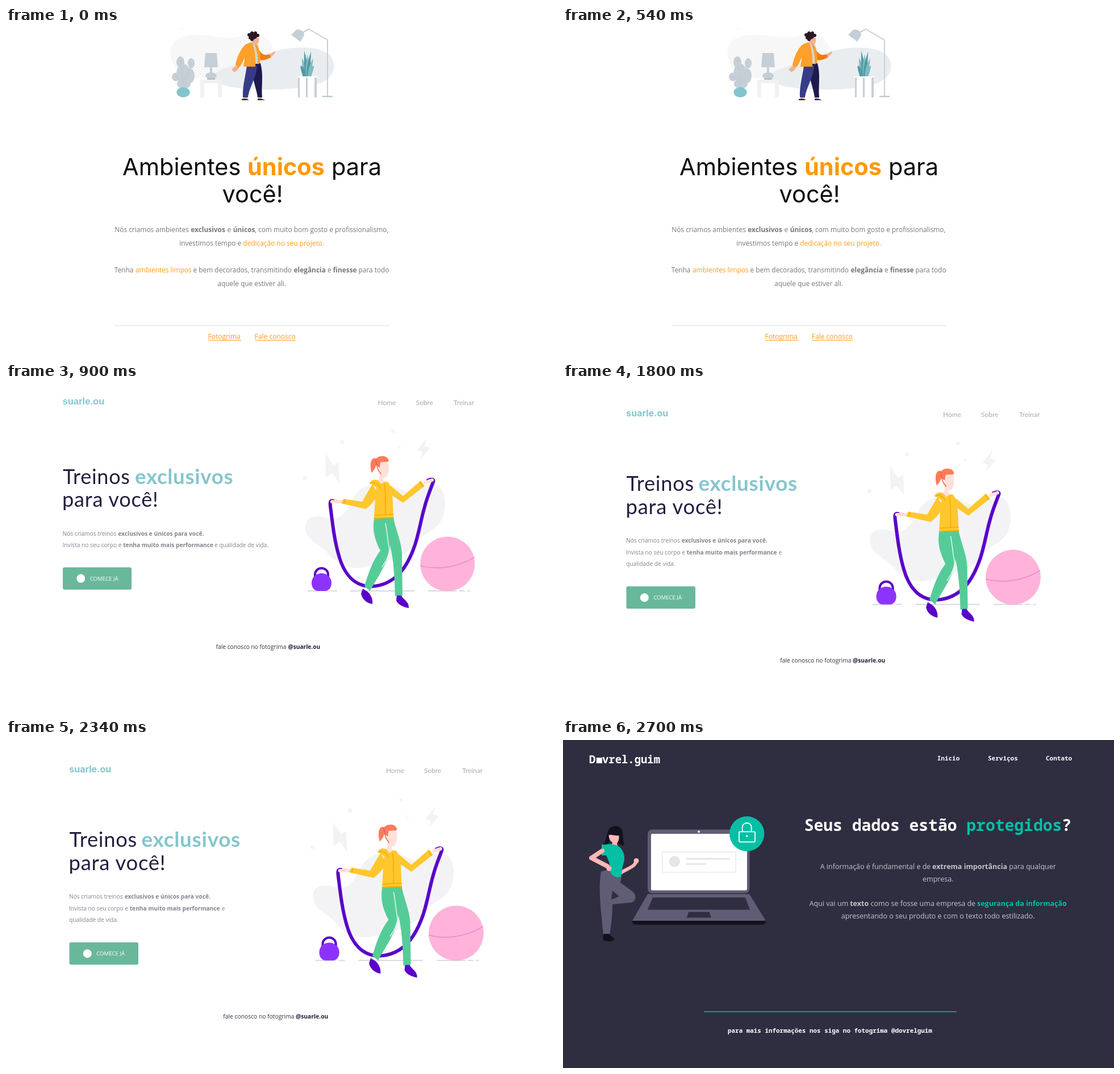
Animation of 970 by 577 pixels, one loop 3.6 s. Source, as an HTML page:

```html
<!DOCTYPE html>
<html lang="pt-BR">
<head>
<meta charset="utf-8">
<title>Páginas</title>
<style>
  html, body { margin: 0; width: 100%; height: 100%; overflow: hidden; background: #fff; }
  svg { display: block; width: 970px; height: 577px; }
  text { white-space: pre; font-optical-sizing: none; }
  .open { font-family: "Open Sans", sans-serif; }
  .inter { font-family: Inter, sans-serif; }
  .lato { font-family: Lato, sans-serif; }
  .arial { font-family: "Liberation Sans", Arial, sans-serif; }
  .mono { font-family: "Noto Sans Mono", monospace; }
</style>
</head>
<body>
<svg id="stage" viewBox="0 0 970 577" xmlns="http://www.w3.org/2000/svg"></svg>
<script>
const SLIDE_MS = 900;

// Markup helpers
const text = (font, size, fill, weight, x, y, str) =>
  `<text class="${font}" font-size="${size}" fill="${fill}" font-weight="${weight}" x="${x}" y="${y}">${str}</text>`;
// runs: [x, text, weight, colour]
const line = (size, fill, y, ...runs) =>
  runs.map(([x, str, weight = 400, col = fill]) => text('open', size, col, weight, x, y, str)).join('');
const path = (d, fill) => `<path d="${d}" fill="${fill}"/>`;
const stroke = (d, col, w, cap = 'round') =>
  `<path d="${d}" fill="none" stroke="${col}" stroke-width="${w}" stroke-linecap="${cap}" stroke-linejoin="round"/>`;
const oval = (x, y, rx, ry, fill) => `<ellipse cx="${x}" cy="${y}" rx="${rx}" ry="${ry}" fill="${fill}"/>`;
const dot = (x, y, r, fill) => oval(x, y, r, r, fill);
const box = (x, y, w, h, fill, r = 0) =>
  `<rect x="${x}" y="${y}" width="${w}" height="${h}" rx="${r}" fill="${fill}"/>`;

function livingRoom() {
  const grey = '#c5cfd7', pale = '#f1f1f1', teal = '#84c4cc';
  const navy = '#1d1a4f', blue = '#373c88', orange = '#ffa02b', skin = '#f0b095';
  const backdrop =
    `<pattern id="specks" width="6" height="5" patternUnits="userSpaceOnUse">
      <circle cx="1.5" cy="1.5" r="1" fill="#efefef"/><circle cx="4.5" cy="4" r="1" fill="#efefef"/></pattern>` +
    oval(309, -2, 8, 3, '#ececec') +
    ['#f9f9f9', 'url(#specks)'].map(fill => path(
      'M290 50C286 25 304 12 338 12C372 12 386 22 414 14C440 8 466 14 468 34C466 58 400 64 372 78C344 96 298 92 290 50Z', fill)).join('') +
    path('M366 84C370 69 412 66 452 48C492 31 552 28 571 49C586 70 575 93 540 101C490 112 404 110 379 99C368 94 363 90 366 84Z', '#eaedf0');
  const plant =
    oval(307, 60, 7, 10, grey) + oval(299, 86, 7, 7.5, grey) + oval(326, 62, 6, 9, grey) +
    oval(312, 80, 12, 17, grey) + oval(324, 84, 8, 13, grey) + oval(313, 98, 12, 9, grey) +
    stroke('M308 56C309 72 312 88 312 103M325 62C324 76 318 86 313 92M299 86L311 96', '#b7c3cc', .7) +
    oval(312, 113, 11.7, 9, teal);
  const table =
    path('M351 44H371L373 69H349Z', grey) + box(359, 69, 4, 10, grey) +
    oval(361, 84, 10, 6, grey) + box(354, 88, 14, 3, '#b4c0c9') +
    box(342, 91, 38, 6, pale) + box(342, 95, 7, 27, pale) + box(373, 95, 7, 27, pale);
  const man =
    path('M437 62H448C454 84 449 103 451 122H443C441 108 436 96 434 82Z', navy) +
    path('M424 66H442C441 88 429 102 426 122H417C416 102 422 84 424 66Z', blue) +
    path('M418 122H425L426 125H417ZM443 122H450L451 125H444Z', skin) +
    path('M415 127V125C419 124 424 124 428 127ZM443 127V125C447 124 452 125 456 127Z', navy) +
    path('M444 36C449 44 453 50 464 46L467 51C457 58 448 58 443 54Z', '#f07c13') +
    path('M464 46C468 45 470 42 473 41L474 43C472 46 470 49 466 51Z', skin) +
    path('M433 26L443 27C447 38 448 52 445 63H436Z', '#d0d6db') +
    path('M407 64L410 70C408 74 404 78 401 77L397 73Z', skin) +
    path('M432 25C437 32 440 48 439 68H418C419 60 420 56 420 52C417 60 414 65 410 70L404 65C407 49 416 30 426 27Z', orange) +
    path('M439 26C446 35 449 44 447 62L443 64C444 48 441 36 436 26Z', orange) +
    path('M433 17H445C446 24 444 29 440 28L439 32L433 27Z', skin) +
    oval(435, 14, 7.5, 6, '#2a1922') +
    [[428, 12], [433, 9], [439, 9], [443, 13], [430, 17], [433, 20]].map(([x, y]) => dot(x, y, 3, '#2a1922')).join('');
  const leaves = [[521, 52, -3], [525, 40, -1], [531, 46, 0], [537, 41, 1], [541, 53, 3], [519, 66, -5], [542, 66, 5]];
  const stand = leaves.map(([x, y, k], i) =>
      path(`M${x} ${y}Q${531 + k * 1.5 + 4} 70 ${532 + k} 86H${528 + k}Q${528 + k * 1.8 - 2} 68 ${x} ${y}Z`,
        i % 2 ? '#5199a2' : '#7bbcc2')).join('') +
    box(513, 85, 35, 4, '#fff') + box(514, 87, 3, 35, grey) + box(528, 87, 3, 35, grey) + box(543, 87, 4, 35, grey) +
    box(517, 87, 11, 35, '#fff') + box(531, 87, 12, 35, '#fff');
  const lamp =
    stroke('M566 120V21L533 2L522 8', grey, 2) + box(557, 119.5, 18, 2, '#b2bec8') +
    path('M502 12L511 3C518 1 525 6 525 13L518 24Z', grey);
  return backdrop + plant + table + man + stand + lamp;
}

function interiors() {
  const orange = '#ff9a1a', grey = '#77777a', under = 'M356 549.3H414.5M438.5 549.3H510';
  const head = (x, y, str, weight = 400, fill = '#0b0b0b') => text('inter', 41.5, fill, weight, x, y, str);
  return livingRoom() +
    head(205, 259, 'Ambientes') + head(425, 259, 'únicos', 700, '#ff9900') + head(573, 259, 'para') +
    head(380.5, 307, 'você!') +
    line(11.9, grey, 359, [191.3, 'Nós criamos ambientes'], [325.3, 'exclusivos', 700], [389.5, 'e'],
      [399.7, 'únicos', 700], [438, ', com muito bom gosto e profissionalismo,']) +
    line(11.9, grey, 383, [305.2, 'investimos tempo e'], [417.3, 'dedicação no seu projeto.', 400, orange]) +
    line(11.9, grey, 430, [190.7, 'Tenha'], [228, 'ambientes limpos', 400, orange],
      [329.5, 'e bem decorados, transmitindo'], [506.5, 'elegância', 700], [566, 'e'],
      [575.7, 'finesse', 700], [620.5, 'para todo']) +
    line(11.9, grey, 454, [372.3, 'aquele que estiver ali.']) +
    box(191, 522, 484, 2.6, '#f1f1f1') +
    line(12, orange, 547, [355.5, 'Fotogrima'], [437.7, 'Fale conosco']) + stroke(under, orange, 1, 'butt');
}

function jumper() {
  const violet = '#5a00c9', yellow = '#ffc72d', amber = '#f7ab00', green = '#55cc98';
  const skin = '#ffe1da', red = '#ff7b5b', mist = '#f3f3f6';
  const scene =
    path('M527 254C525 236 541 228 566 236C604 244 602 200 626 184C650 170 684 178 704 190C724 200 730 174 752 176C774 180 777 212 769 234C760 258 740 258 728 274C706 308 654 318 624 323C588 328 572 302 556 288C542 278 528 270 527 254Z', mist) +
    path('M562 122L576 143L585 138L587 174L574 157L563 164ZM741 95L737 109L747 112L729 133L733 120L724 116Z', mist) +
    dot(592, 102, 3.4, mist) + dot(681, 83, 3, mist) + dot(693, 112, 2, mist) + dot(526, 166, 3.6, mist) +
    stroke('M532 364H566M573 364H582M607 364H718M744 364H793M798 364H807M813 364H816', '#d6d8e3', 2);
  const gear =
    stroke('M544 340V335A11.5 11 0 0 1 567 335V340', violet, 4) +
    path('M538 350C538 339 547 333 555.5 333S573 339 573 350C573 359 567 364 562 364H549C544 364 538 359 538 350Z', '#8d33ff') +
    dot(777.3, 316.5, 48, '#ffb3da') + stroke('M730 320C762 328 796 322 824 305', '#ee8fc8', 1.8);
  const rope = stroke(
    'M576 205.5H573C570 206 570.5 212 571.5 219C575 247 578 275 586 302C595 334 613 356 643 356C688 354 708 318 720 283C728 258 730 240 737 216C742 197 748 184 752.5 171C753 167 748 167 743 169.5', violet, 6);
  const legs =
    path('M648 237L682 234C685 254 696 276 697 298L698 372L685 373C684 338 682 306 676 284C677 308 655 338 641 364L631 356C638 332 646 310 659 293C648 272 645 256 648 237Z', green) +
    stroke('M668 245C671 260 672 276 675 292C674 302 668 313 662 322', '#fff', 1.2) +
    path('M628 360L636 365C643 371 646 379 645 387C636 386 627 379 625 369ZM688 372H696C700 380 710 383 709 394C700 393 690 388 687 381Z', violet);
  const body =
    stroke('M574 207H592M738 173L750 169', skin, 6) +
    stroke('M576 205L582 208M580 203L586 206M745 167L750 171', '#e9b9b1', .8) +
    path('M645 176L627 207L594 202L590 210L633 220C642 214 650 203 656 195ZM676 178L699 197L730 170L737 179L699 209L677 194Z', yellow) +
    path('M640 174C644 167 652 167 658 171L672 172C682 182 681 210 682 236H648C649 216 650 196 652 182Z', yellow) +
    stroke('M666 176C669 194 668 212 668 229M649 231L682 229M648 236.5L682 235M641 175C648 171 656 176 659 183M597 203L595 210M729 173L734 181', amber, 1.6) +
    path('M658 158L664 164L665 173L660 176L656 170Z', skin) +
    path('M658 136C664 131 673 134 674 142C675 154 672 165 665 165C657 164 655 148 658 136Z', skin) +
    path('M650 134C653 125 673 123 674 136C669 138 663 136 659 138L658 147C653 146 650 140 650 134Z', red) +
    path('M651 131C643 128 639 140 644 157C646 152 651 150 652 140Z', red) +
    stroke('M651 133C652 145 655 153 660 158', '#ef5f42', 1.5);
  return scene + gear + rope + legs + body;
}

function button(x, y, w) {
  return box(x, y, w, 39.3, '#69b89c', 3) + dot(x + 31.8, y + 19.7, 7.5, '#fff') +
    text('open', 9.6, '#fff', 400, x + 47.7, y + 23.2, 'COMECE JÁ');
}

function training(wide) {
  const ink = '#231f3f', teal = '#86c5cc', grey = '#85838e', menu = '#a9a7b2';
  const x = wide ? 111.5 : 100, y = wide ? 12.4 : 0, size = wide ? 36.3 : 36;
  const brand = wide
    ? text('inter', 16, teal, 700, 111.3, 57, 'suarle.ou')
    : text('arial', 16.6, teal, 700, 99.5, 35.5, 'suarle.ou');
  const nav = (wide ? [669, 736, 803] : [654.5, 721.5, 788])
    .map((nx, i) => text('lato', 12, menu, 400, nx, wide ? 58 : 36.5, ['Home', 'Sobre', 'Treinar'][i])).join('');
  const title = `<g letter-spacing=".75">` +
    text('lato', size, ink, 400, x, 176 + y, 'Treinos') +
    text('lato', size + .5, teal, 700, x + 127, 176 + y, 'exclusivos') +
    text('lato', size + .2, ink, 400, x - 1, 216.4 + y, 'para você!') + '</g>';
  const copy = line(10.2, grey, 267 + y, [x - .5, 'Nós criamos treinos'], [x + 97.3, 'exclusivos e únicos para você.', 700]) +
    line(10.2, grey, 287.2 + y, [x - .5, 'Invista no seu corpo e'], [x + 106.2, 'tenha muito mais performance', 700],
      [x + (wide ? 268.3 : 267), wide ? 'e' : 'e qualidade de vida.']) +
    (wide ? line(10.2, grey, 320, [x - .5, 'qualidade de vida.']) : '');
  const foot = wide
    ? line(10.3, '#33303f', 490, [382.3, 'fale conosco no fotogrima'], [510, '@suarle.ou', 700, ink])
    : line(10.2, '#33303f', 466, [369.6, 'fale conosco no fotogrima'], [496.5, '@suarle.ou', 700, ink]);
  const art = wide ? 'matrix(1.007 0 0 1.007 9.7 21.2)' : 'translate(0 0)';
  return brand + nav + title + copy + (wide ? button(111.5, 356, 121.5) : button(100, 322.4, 121)) +
    `<g transform="${art}">${jumper()}</g>` + foot;
}

function laptop(bg, teal) {
  const steel = '#605c75', black = '#13121c', pale = '#e6e6e6';
  return box(149, 157.5, 179.5, 112, steel, 8) + box(155, 165, 169, 99.5, '#fff', 2.5) + dot(239, 161.3, 2, '#fff') +
    `<rect x="174.7" y="196.8" width="129.5" height="35.8" rx="1.5" fill="none" stroke="${pale}" stroke-width="1.3"/>` +
    dot(196.2, 213.6, 9.6, pale) + box(216, 207.5, 78.5, 3, pale, 1.5) + box(216, 216.8, 36, 3, pale, 1.5) +
    path('M122 317H357V320Q356 325 350 325H129Q123 325 122 320Z', black) +
    path('M149 271H328L357 318H122Z', steel) +
    path('M158 277H321L329 298.5H149ZM221 302.5H257.5L261 312.5H218Z', bg) +
    dot(323.7, 165, 30.7, teal) +
    `<rect x="310" y="161.3" width="28" height="18" rx="1.2" fill="none" stroke="#fff" stroke-width="1.8"/>` +
    stroke('M315.7 161V153.5A8 7.5 0 0 1 331.7 153.5V161', '#fff', 1.8, 'butt') + dot(323.7, 169, 1.8, '#fff');
}

function analyst(teal) {
  const steel = '#605c75', black = '#13121c', skin = '#ffb8b8';
  return path('M78 164C80 152 91 149 99 153C107 157 105 168 106 176L108 185C102 186 97 182 95 178L82 176C82 182 77 186 71 185C75 178 76 171 78 164Z', black) +
    path('M81 165H98C100 174 97 180 95 181L96 189L85 188L87 180C82 177 80 172 81 165Z', skin) +
    path('M79 167C80 156 98 154 101 168C93 169 86 166 79 167Z', black) +
    path('M67 232C76 226 96 231 103 238C103 244 101 248 101 251L122 266C130 272 129 284 120 286L87 289C87 308 85 326 82 342H71C68 308 61 262 67 232ZM87 265L85 281L99 275Z', steel) +
    path('M72 341H81C83 345 91 347 90 351C88 355 76 355 71 352C70 348 70 345 72 341Z', black) +
    stroke('M101 234C110 228 118 226 125 220L130 213', skin, 6) + dot(129, 212.5, 4.5, skin) +
    path('M68 184C77 184 88 181 98 187C107 194 111 206 106 219C103 228 105 236 101 241C92 243 86 238 83 232C84 220 80 211 76 203L68 203Z', teal) +
    stroke('M69 195L50 207.5L78 222', skin, 8) + dot(81, 226, 4.5, skin);
}

function security() {
  const bg = '#2f2d40', teal = '#05bfa5', body = '#c6c5cb';
  const mono = (size, x, y, str, fill = '#fff', weight = 700) => text('mono', size, fill, weight, x, y, str);
  return box(0, 0, 970, 577, bg) +
    mono(18.9, 46, 40.5, 'D', '#fff', 600) + box(58.8, 31, 10, 10, '#fff') + mono(18.9, 69, 40.5, 'vrel.guim', '#fff', 600) +
    mono(11, 658.7, 36, 'Inicio') + mono(11, 748, 36, 'Serviços') + mono(11, 850, 36, 'Contato') +
    laptop(bg, teal) + analyst(teal) +
    mono(28, 424.7, 160, 'Seus dados estão') + mono(28, 710.3, 160, 'protegidos', teal) + mono(28, 878.3, 160, '?') +
    line(12.5, body, 227, [452.7, 'A informação é fundamental e de'], [650, 'extrema importância', 700], [785.3, 'para qualquer']) +
    line(12.5, body, 248.6, [633, 'empresa.']) +
    line(12.5, body, 292.2, [433.7, 'Aqui vai um'], [505.2, 'texto', 700], [541.5, 'como se fosse uma empresa de'],
      [729, 'segurança da informação', 700, teal]) +
    line(12.5, body, 314, [489.7, 'apresentando o seu produto e com o texto todo estilizado.']) +
    box(248, 477, 444.7, 1.8, '#07a792') +
    mono(10.92, 290, 514.5, 'para mais informações nos siga no fotogrima @dovrelguim');
}

const stage = document.getElementById('stage');
stage.innerHTML = box(0, 0, 970, 577, '#fff') +
  [interiors(), training(false), training(true), security()].map(s => `<g class="slide">${s}</g>`).join('');
const slides = [...stage.querySelectorAll('.slide')];

function draw(ms) {
  const current = Math.floor(ms / SLIDE_MS) % slides.length;
  slides.forEach((s, i) => s.setAttribute('display', i === current ? 'inline' : 'none'));
}

const start = performance.now();
function tick() {
  draw(performance.now() - start);
  requestAnimationFrame(tick);
}
draw(0);
requestAnimationFrame(tick);
</script>
</body>
</html>
```
